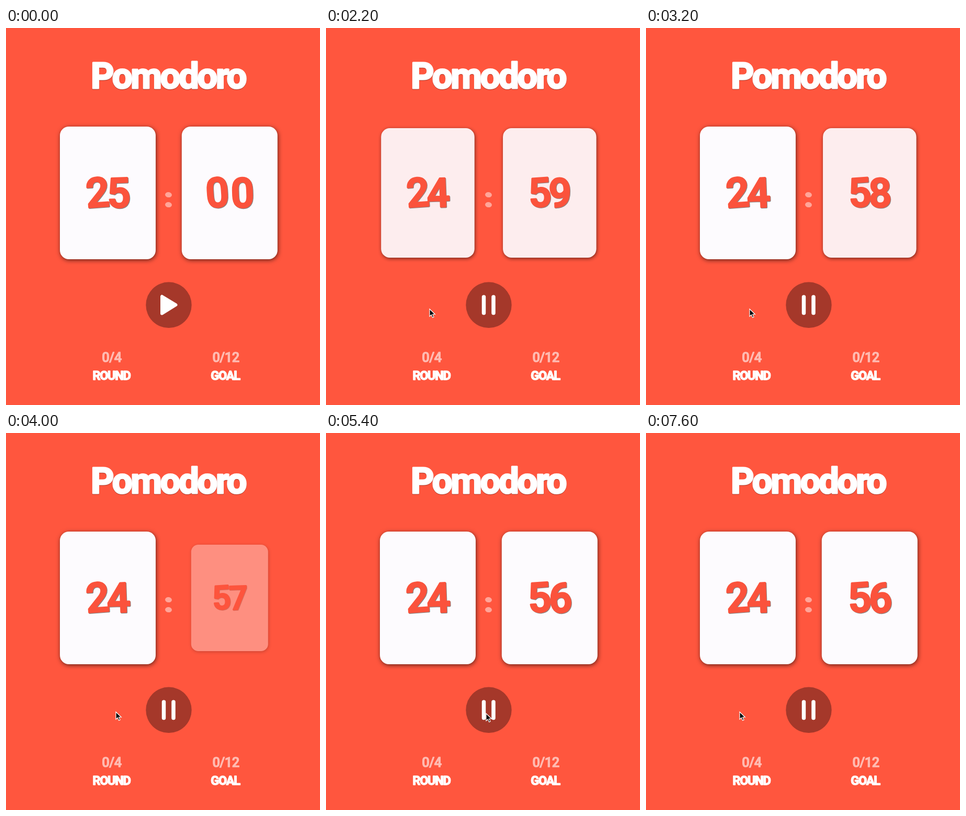
Write an HTML page that moves like this. It is 600x719 px and loops after 8000 ms.

```html
<!DOCTYPE html>
<html lang="en">
<head>
<meta charset="utf-8">
<title>Pomodoro</title>
<style>
html, body { margin: 0; width: 100%; height: 100%; overflow: hidden; background: #ff563e; }
svg { display: block; width: 100%; height: 100%; }
text { font-family: Roboto, "Open Sans", sans-serif; text-anchor: middle; stroke-linejoin: round; fill: #fff; stroke: #fff; }
.title { font-size: 69px; font-weight: 700; letter-spacing: -3.5px; stroke-width: 3px; filter: drop-shadow(0 1px .5px #0005); }
.card { filter: drop-shadow(1px 2px 4px #0009); }
.card rect { fill: #fdfbfe; }
.card text { font-size: 78px; font-weight: 500; fill: #fb533c; stroke: #fb533c; stroke-width: 3.5px; filter: drop-shadow(1px 1.5px 0 #666c); }
.label { font-size: 23.5px; font-weight: 700; letter-spacing: -1.3px; stroke-width: 1.5px; }
.count { font-size: 25.5px; font-weight: 500; letter-spacing: -.6px; stroke-width: 1.2px; opacity: .6; }
</style>
</head>
<body>
<svg viewBox="0 0 600 719">
  <text class="title" x="309.500" y="115">Pomodoro</text>
  <g id="minutes" class="card"><rect x="-91.5" y="-126.5" width="183" height="253" rx="17"/><text y="28" rotate="-4 -2"></text></g>
  <g id="seconds" class="card"><rect x="-91.5" y="-126.5" width="183" height="253" rx="17"/><text y="28" rotate="-4 -2"></text></g>
  <g fill="#fff" opacity=".47">
    <ellipse cx="310.5" cy="318" rx="6.5" ry="5" transform="rotate(8 310 318)"/>
    <ellipse cx="310.5" cy="337" rx="6.5" ry="5" transform="rotate(8 310 337)"/>
  </g>
  <circle cx="311" cy="528.3" r="43.7" fill="#a5382a"/>
  <path id="play" d="M298 512V544.5L324.5 528Z" fill="#fff" stroke="#fff" stroke-width="6" stroke-linejoin="round"/>
  <path id="pause" d="M301.5 513V543.5M320 513V543.5" stroke="#fff" stroke-width="7.5" stroke-linecap="round"/>
  <text class="count" x="202" y="637">0/4</text>
  <text class="label" x="201.5" y="671">ROUND</text>
  <text class="count" x="420" y="637">0/12</text>
  <text class="label" x="419" y="671">GOAL</text>
  <path id="cursor" d="M0 0V14L3.3 11L5.6 16.2L8 15.1L5.7 10H10.3Z" fill="#000" stroke="#fff" stroke-width="1.2"/>
</svg>
<script>
const LOOP = 8000, FIRST_TICK = 1890, GROW = 450;
const find = id => document.getElementById(id);

// Cursor stops: time, x, y
const stops = [
  [100, 107, 640], [500, 310, 535], [800, 310, 535], [1500, 108, 560],
  [2100, 198, 536], [3400, 198, 536], [4000, 210, 532], [5000, 226, 548],
  [5400, 306, 535], [5650, 306, 535], [6200, 126, 575], [6650, 308, 535],
  [7050, 308, 535], [7600, 179, 532], [LOOP, 179, 532]
];

const smooth = u => u * u * (3 - 2 * u);

// Cubic bezier easing (.25, .1, .35, 1), solved by bisection
function ease(u) {
  if (u <= 0 || u >= 1) return u <= 0 ? 0 : 1;
  const curve = (a, b, s) => 3 * (1 - s) ** 2 * s * a + 3 * (1 - s) * s * s * b + s ** 3;
  let low = 0, high = 1;
  for (let i = 0; i < 20; i++) {
    const mid = (low + high) / 2;
    if (curve(.25, .35, mid) < u) low = mid; else high = mid;
  }
  return curve(.1, 1, low);
}

function setCard(id, x, value, grow) {
  const card = find(id), label = card.lastChild, spacing = value === "00" ? 3 : -5;
  card.setAttribute("transform", `translate(${x} 314.5) scale(${.7 + .3 * grow})`);
  card.setAttribute("opacity", grow);
  label.textContent = value;
  label.setAttribute("letter-spacing", spacing);
  label.setAttribute("x", spacing / 2 + 2);
}

function setCursor(t) {
  const i = Math.max(1, stops.findIndex(stop => stop[0] > t));
  const [t0, x0, y0] = stops[i - 1], [t1, x1, y1] = stops[i];
  const u = smooth(Math.max(0, (t - t0) / (t1 - t0)));
  find("cursor").setAttribute("transform", `translate(${x0 + (x1 - x0) * u} ${y0 + (y1 - y0) * u})`);
  find("cursor").setAttribute("visibility", t < 100 ? "hidden" : "visible");
}

function draw(now) {
  const t = now % LOOP;
  const ticks = Math.max(0, Math.min(4, Math.floor((t - FIRST_TICK) / 1000) + 1));
  const age = n => n ? ease((t - FIRST_TICK - (n - 1) * 1000) / GROW) : 1;
  setCard("minutes", 194.5, ticks ? "24" : "25", age(Math.min(ticks, 1)));
  setCard("seconds", 427.3, ticks ? String(60 - ticks) : "00", age(ticks));
  const running = t >= 850 && t < 5500 || t >= 7000;
  find("play").setAttribute("visibility", running ? "hidden" : "visible");
  find("pause").setAttribute("visibility", running ? "visible" : "hidden");
  setCursor(t);
  requestAnimationFrame(draw);
}
requestAnimationFrame(draw);
</script>
</body>
</html>
```
